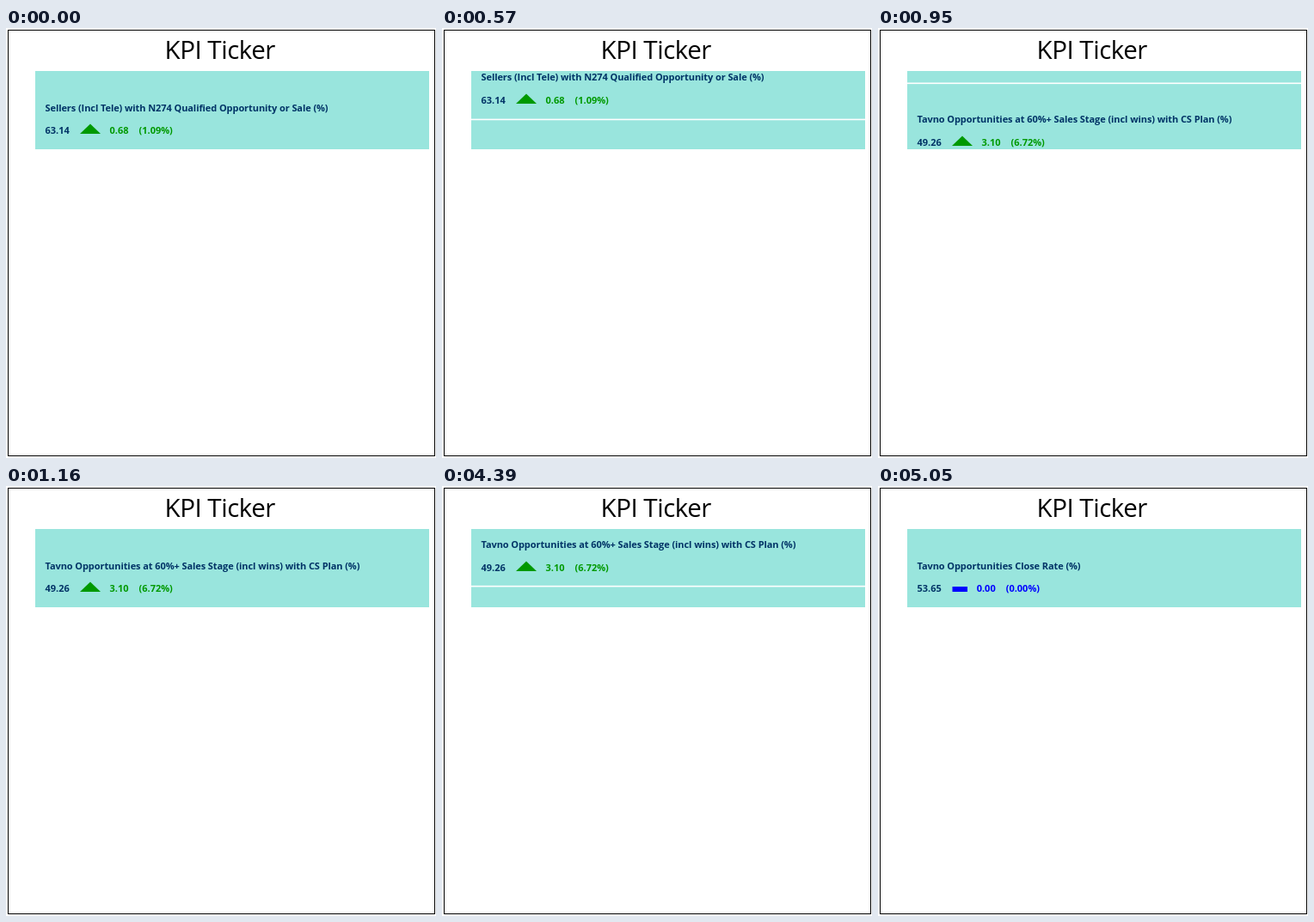
An HTML page for the animation above (6.03 s loop, 500 by 500 pixels).

```html
<!DOCTYPE html>
<html lang="en">
<head>
<meta charset="utf-8">
<title>KPI Ticker</title>
<style>
  html, body { margin: 0; width: 100%; height: 100%; overflow: hidden; background: #fff; }
  svg { display: block; width: 100%; height: 100%; }
  text { font-family: "Open Sans", "Noto Sans", sans-serif; white-space: pre; }
  .head { font-size: 29.5px; letter-spacing: -0.48px; }
  .kpi { font-size: 11px; font-weight: 700; fill: #003366; }
  .title { letter-spacing: -0.08px; }
</style>
</head>
<body>
<svg viewBox="0 0 500 500">
  <defs><clipPath id="box"><rect x="34" y="50" width="458" height="91"/></clipPath></defs>
  <rect x="2.5" y="2.5" width="496" height="495" fill="#fff" stroke="#000"/>
  <text class="head" x="184.5" y="36">KPI Ticker</text>
  <g clip-path="url(#box)">
    <rect x="34" y="50" width="458" height="91" fill="#99e5dd"/>
    <rect id="gap" x="34" width="458" height="1.6" fill="#fff"/>
    <g id="titles"></g>
    <g id="rows"></g>
  </g>
</svg>
<script>
const LOOP = 6030, PITCH = 91, STEPS = 24;

const items = [
  { title: "Sellers (Incl Tele) with N274 Qualified Opportunity or Sale (%)",
    value: "63.14", change: "0.68", percent: "(1.09%)", up: true },
  { title: "Tavno Opportunities at 60%+ Sales Stage (incl wins) with CS Plan (%)",
    value: "49.26", change: "3.10", percent: "(6.72%)", up: true },
  { title: "Tavno Opportunities Close Rate (%)",
    value: "53.65", change: "0.00", percent: "(0.00%)", up: false }
];

// Each scroll runs in two bursts: steps 0-13, then 14-24.
const scrolls = [
  { start: 140, pause: 700, resume: 750, end: 1160 },
  { start: 4030, pause: 4600, resume: 4640, end: 5050 }
];

const byId = id => document.getElementById(id);
const titles = byId("titles"), rows = byId("rows"), gap = byId("gap");

function add(parent, tag, attrs, content = "") {
  const el = document.createElementNS("http://www.w3.org/2000/svg", tag);
  for (const key in attrs) el.setAttribute(key, attrs[key]);
  el.textContent = content;
  parent.append(el);
}

items.forEach((item, i) => {
  const y = 123 + i * PITCH;
  const color = item.up ? "#009900" : "#0000ff";
  const left = item.up ? 120.5 : 114.7;
  const label = (x, str, fill) =>
    add(rows, "text", { class: "kpi", x, y, style: `fill:${fill}` }, str);

  add(titles, "text", { class: "kpi title", x: 45.5, y: y - 26 }, item.title);
  label(45.5, item.value, "#003366");
  add(rows, "path", {
    d: item.up ? `M86 ${y}L98 ${y - 11.5}L110 ${y}Z` : `M86.5 ${y - 6}h17.5v6h-17.5z`,
    fill: color
  });
  label(left, item.change, color);
  label(left + 34, item.percent, color);
});

function stepAt(t, s) {
  if (t < s.start) return -1;
  if (t >= s.end) return STEPS;
  if (t < s.resume) return Math.min(13, Math.floor((t - s.start) / (s.pause - s.start) * 13));
  return 14 + Math.floor((t - s.resume) / (s.end - s.resume) * 10);
}

function travel(n) {
  if (n < 0) return 0;
  if (n >= STEPS) return PITCH;
  const p = 0.061 + 0.03471 * n + 0.000184 * n * n;
  return PITCH * (1 - Math.cos(Math.PI * p)) / 2;
}

function draw(t) {
  let offset = 0, moving = false;
  for (const s of scrolls) {
    const n = stepAt(t, s), d = travel(n);
    offset += d;
    if (n >= 0 && n < STEPS) {
      moving = true;
      gap.setAttribute("y", 140.7 - d);
    }
  }
  gap.setAttribute("visibility", moving ? "visible" : "hidden");
  titles.setAttribute("transform", `translate(0 ${-Math.ceil(offset)})`);
  rows.setAttribute("transform", `translate(0 ${-Math.floor(offset)})`);
}

const origin = performance.now();
function tick() {
  draw((performance.now() - origin) % LOOP);
  requestAnimationFrame(tick);
}
tick();
</script>
</body>
</html>
```
